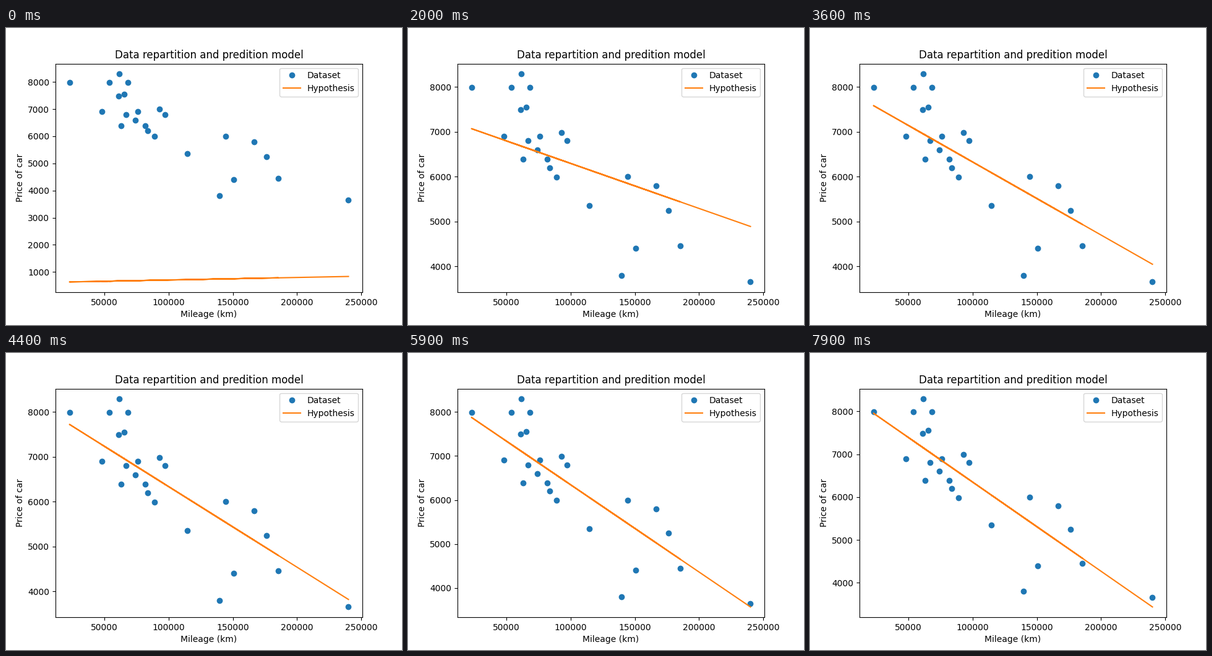
Recreate the animation shown at these times as a matplotlib script. Size 640 by 480 pixels, loop 8 s.

```python
import numpy as np
import matplotlib.pyplot as plt
from matplotlib.animation import FuncAnimation

FRAMES, INTERVAL = 80, 100
STEPS_PER_FRAME = 10
RATE = 0.1

MILEAGE = np.array([
    240000, 139800, 150500, 185530, 176000, 114800, 166800, 89000,
    144500, 84000, 82029, 63060, 74000, 97500, 67000, 76025,
    48235, 93000, 60949, 65674, 54000, 68500, 22899, 61789], float)
PRICE = np.array([
    3650, 3800, 4400, 4450, 5250, 5350, 5800, 5990,
    5999, 6200, 6390, 6390, 6600, 6800, 6800, 6900,
    6900, 6990, 7490, 7555, 7990, 7990, 7990, 8290], float)

scaled = (MILEAGE - MILEAGE.min()) / np.ptp(MILEAGE)


def descend():
    """Predictions of the linear model, kept after every tenth descent step."""
    offset = slope = 0.0
    kept = []
    for step in range((FRAMES - 1) * STEPS_PER_FRAME + 1):
        error = offset + slope * scaled - PRICE
        offset, slope = (offset - RATE * error.mean(),
                         slope - RATE * (error * scaled).mean())
        if step % STEPS_PER_FRAME == 0:
            kept.append(offset + slope * scaled)
    return kept


predictions = descend()

fig, ax = plt.subplots(figsize=(6.4, 4.8), dpi=100)
ax.plot(MILEAGE, PRICE, "o", label="Dataset")
hypothesis, = ax.plot(MILEAGE, predictions[0], label="Hypothesis")
ax.set_title("Data repartition and predition model")
ax.set_xlabel("Mileage (km)")
ax.set_ylabel("Price of car")
ax.legend(loc="upper right")


def update(frame):
    hypothesis.set_ydata(predictions[frame])
    ax.relim()
    ax.autoscale_view()
    return hypothesis,


anim = FuncAnimation(fig, update, frames=FRAMES, interval=INTERVAL,
                     init_func=lambda: update(0), repeat=True, repeat_delay=0)
plt.show()
```
